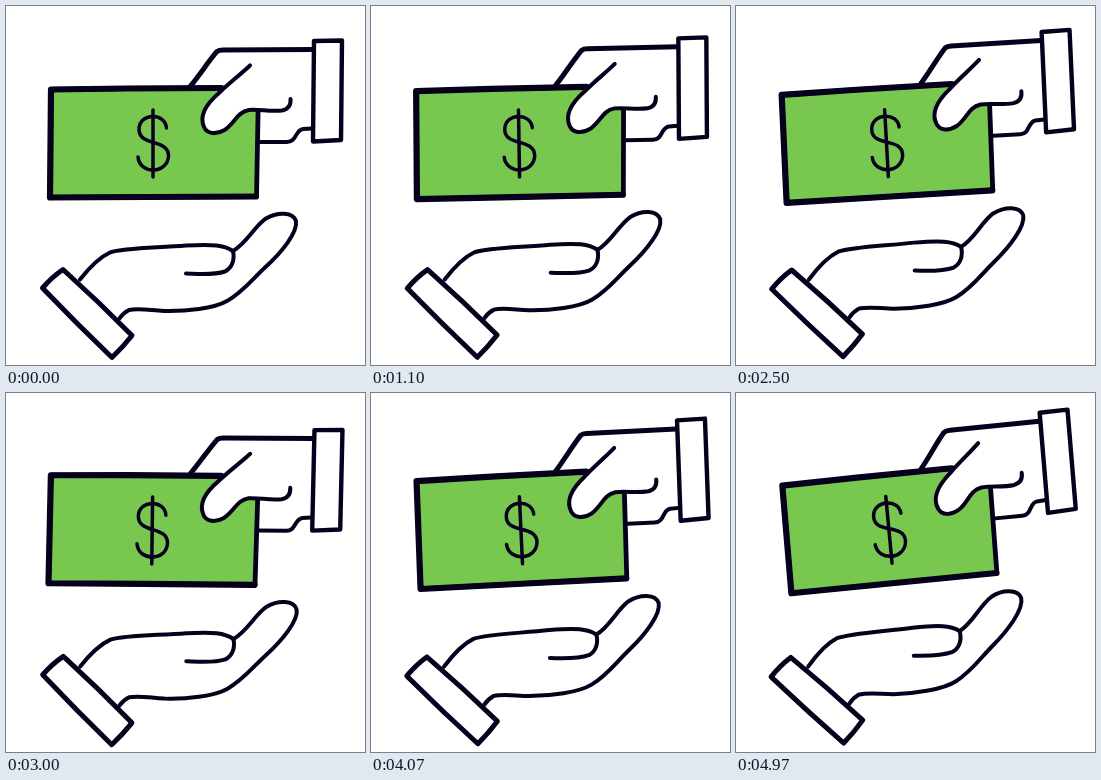
An HTML page for the animation above (5000 ms loop, 359 by 359 pixels).

```html
<!DOCTYPE html>
<html lang="en">
<head>
<meta charset="utf-8">
<title>Handing over cash</title>
<style>
  html, body { margin: 0; width: 100%; height: 100%; overflow: hidden; background: #fff; }
  svg { display: block; width: 100vw; height: 100vh; }
  .ink { fill: none; stroke: #06001c; stroke-width: 4; stroke-linecap: round; stroke-linejoin: round; }
  .paper { fill: #fff; }
  .cuff { stroke-width: 4.4; }
  .bold { stroke-width: 5; }
  .bill { fill: #78c850; stroke-width: 4.8; }
  .edge { stroke-width: 6.2; }
  .sign { stroke-width: 3.5; }
</style>
</head>
<body>
<svg viewBox="0 0 359 359">
  <g id="giver">
    <path class="ink bill" d="M45 83.500 L120 82.500 L252.500 82 L250.500 190.500 L140 191 L44 191.500 Z"/>
    <path class="ink edge" d="M215 82 L120 82.500 L45 83.500 L44 191.500 L140 191 L250 190.500"/>
    <g class="ink sign">
      <path d="M147 104 V171"/>
      <path d="M160.500 122 C159.500 106.500 133.500 106.500 133 123 C132.500 141 162.500 132 162.500 150 C161.500 168.500 133.500 168.500 132 151"/>
    </g>
    <path class="paper" d="M219 79 L207 93 C196 105 195 118 202 125 C208 129 217 127 224 121 C232 112 235 104 250 104 H300 V46 H230 Z"/>
    <path class="ink bold" d="M184.500 80 C193 70 202 56 211 45.500 Q213 44 217 44 L307 43.500"/>
    <path class="ink" d="M244 59.500 C234 69 223 77 213 87 C199 99 193.500 111 198 121 C201 128 210 129 218.500 124 C229 117 231 106 243 104 C253 103 264 106 276 104.500 C283 103 285 99 284.500 93"/>
    <path class="ink" d="M254 136 L281 136 C291 136 289 124 297 123 L306 122.500"/>
    <path class="ink cuff paper" d="M308 35 L336 34.500 L335 134 L307 135.500 Z"/>
  </g>
  <g id="taker">
    <path class="ink paper" d="M74 273.500 C83 262 92 252 104 246.500 C118 242 150 242 180 239.500 C207 238 218 239 227 245 C240 238 248 221 260 212.500 C272 205.500 287 206 290 215 C292 226 276 246 259 261.500 C247 272.500 237 286 221 295 C208 302.500 180 305.500 158 305 C142 304 132 302 123 304 Q117 307 113 313"/>
    <path class="ink" d="M227 245 C229 254 226 262 219 265.500 C207 269.500 193 268 180 267.500"/>
    <path class="ink bold paper" d="M36.500 282 Q46 271 57 263.500 Q93 296 126 329.500 Q117 341 106 351.500 Q71 318 36.500 282 Z"/>
  </g>
</svg>
<script>
  const LOOP = 5000, PERIOD = 1540, PEAK = 586, SWING = 4.1;
  const giver = document.getElementById('giver');
  const taker = document.getElementById('taker');
  const wave = t => Math.cos(2 * Math.PI * (t - PEAK) / PERIOD);
  const turn = (part, angle, x, y) =>
    part.setAttribute('transform', `rotate(${-angle} ${x} ${y})`);

  function draw() {
    const angle = SWING * (wave(performance.now() % LOOP) - wave(0));
    turn(giver, angle, 143, 74);
    turn(taker, angle * 0.5, 75, 313);
    requestAnimationFrame(draw);
  }
  draw();
</script>
</body>
</html>
```
